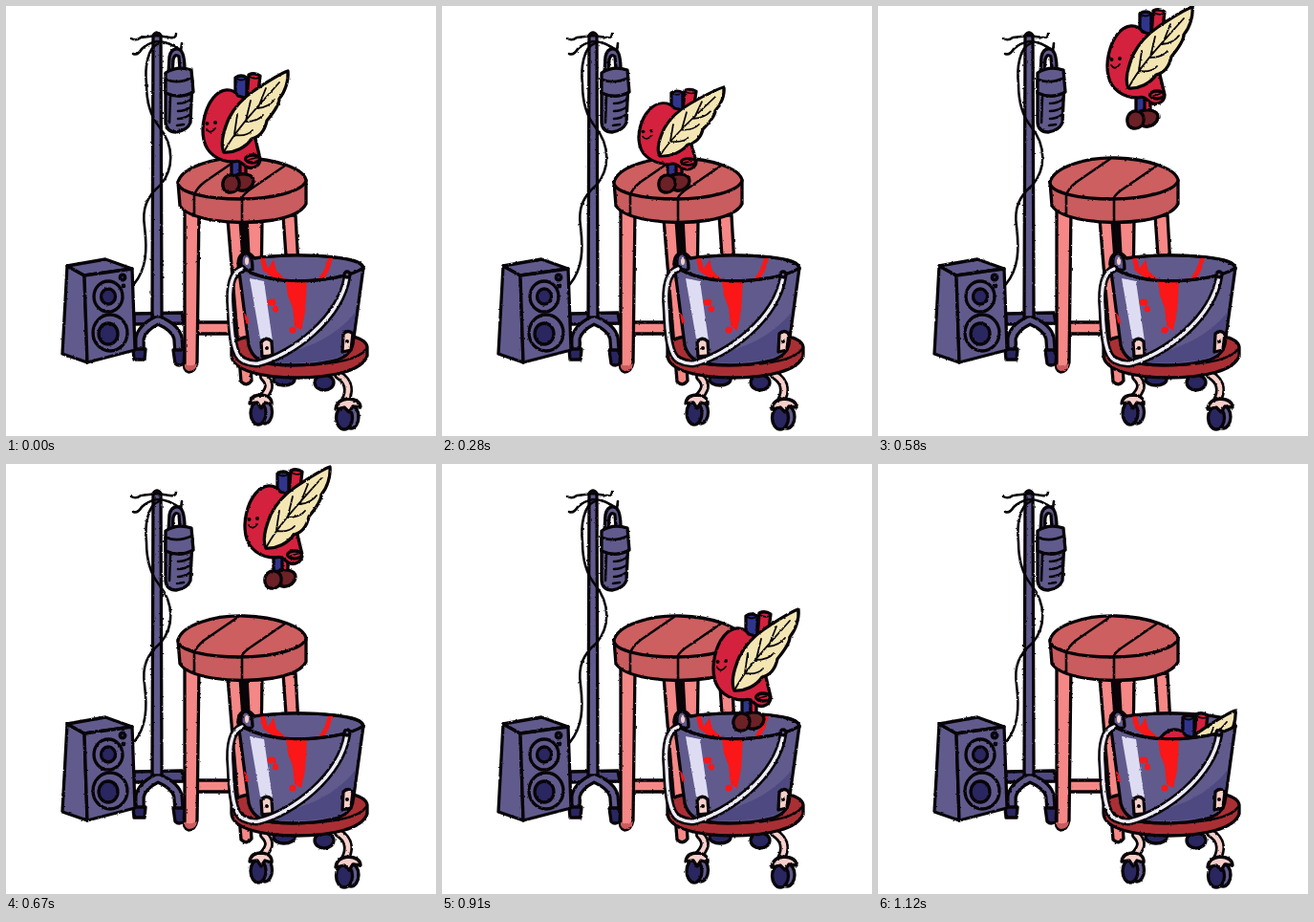
An HTML page that plays this animation: 450 px wide and 450 px high, repeating every 1.18 s.

```html
<!DOCTYPE html>
<html lang="en">
<head>
<meta charset="utf-8">
<title>Bucket jump</title>
<style>
html, body { margin: 0; width: 100%; height: 100%; overflow: hidden; background: #fff; }
svg { display: block; width: 100vw; height: 100vh; }
.ink { stroke: #080408; stroke-width: 3.3; stroke-linejoin: round; stroke-linecap: round; }
.line { fill: none; stroke: #080408; stroke-width: 2.6; stroke-linecap: round; stroke-linejoin: round; }
.thin { stroke-width: 1.8; }
.purple { fill: #605b8c; }
.shade { fill: #4e4980; }
.navy { fill: #292660; }
.seat { fill: #cd5f60; }
.side { fill: #c95c5e; }
.pink { fill: #f58886; }
.pale { fill: #f7cfca; }
.cart { fill: #a92f34; }
.blood { fill: #fb1717; }
.organ { fill: #d4213e; }
.blue { fill: #30358c; }
.shoe { fill: #6b2126; }
.leaf { fill: #f4e6b3; }
.black { fill: #080408; }
.tube { fill: none; stroke-linecap: round; stroke-linejoin: round; }
</style>
</head>
<body>
<svg viewBox="0 0 450 450">
  <defs>
    <filter id="rough" filterUnits="userSpaceOnUse" x="0" y="0" width="450" height="450" color-interpolation-filters="sRGB">
      <feTurbulence id="grain" type="fractalNoise" baseFrequency=".36" numOctaves="1" seed="2"/>
      <feDisplacementMap in="SourceGraphic" scale="2.4" xChannelSelector="R" yChannelSelector="G"/>
    </filter>
    <clipPath id="aboveRim">
      <path d="M0 0H450V274H374C362 282 330 288 302 288C275 287 250 280 243 270H0Z"/>
    </clipPath>
    <path id="standLegs" d="M158 329Q142 337 140 348V362M160 329Q178 337 180 348L181 362"/>
    <path id="handle" d="M247 275C236 279 233 296 235 318C236 344 238 366 248 371Q256 375 264 374C300 365 350 327 357 283"/>
    <path id="leftFork" d="M270 388C278 396 276 402 267 411"/>
    <path id="rightFork" d="M348 386C361 394 359 405 355 413"/>
  </defs>

  <g filter="url(#rough)">
    <g id="stand">
      <path class="ink shade" d="M134 322L184 321L186 332L134 333Z"/>
      <use href="#standLegs" class="tube" stroke="#080408" stroke-width="11.5"/>
      <path class="ink purple" d="M154 31Q158 25 162 31L163 326H153Z"/>
      <use href="#standLegs" class="tube" stroke="#605b8c" stroke-width="5"/>
      <path class="ink navy" d="M133 359H146L145 370H134Z"/>
      <path class="ink navy" d="M175 360H187L186 374Q181 378 177 374Z"/>
      <path class="line" d="M131 34Q136 37 141 33L158 31L172 33Q178 34 178 29M133 50Q138 52 142 45Q148 39 158 37Q171 37 183 47L184 39"/>
      <path class="line" d="M160 39C148 43 145 65 147 82C147 103 152 116 160 126C177 147 175 171 162 187C148 199 142 211 145 231C148 256 147 275 134 291"/>
    </g>

    <g id="bottle">
      <path class="ink purple" d="M170 70L171 53Q173 44 180 45Q187 46 187 67H182L181 53Q177 49 175 56L174 71Z"/>
      <path class="ink purple" d="M167 77L167 122Q168 132 178 132Q190 130 193 122L195 78Z"/>
      <path class="ink purple" d="M167 70Q179 62 194 67L196 90Q182 98 167 91Z"/>
      <path class="line" d="M168 77Q180 82 195 75M180 102Q187 102 193 98M180 110Q187 110 193 106M180 118Q186 118 192 114M179 125L186 124"/>
      <path class="line" d="M172 95L171 122"/>
    </g>

    <g id="speaker">
      <path class="ink purple" d="M64 272L82 282L85 373L59 364Z"/>
      <path class="ink purple" d="M64 272L104 265L132 275L82 282Z"/>
      <path class="ink purple" d="M82 282L132 275L135 360L85 373Z"/>
      <ellipse class="ink purple" cx="107" cy="304" rx="15" ry="16"/>
      <ellipse class="ink navy" cx="107" cy="304" rx="7.5" ry="8"/>
      <ellipse class="ink purple" cx="109" cy="342" rx="18" ry="19"/>
      <ellipse class="ink navy" cx="107" cy="343" rx="10" ry="11"/>
      <circle class="ink navy" cx="122" cy="284" r="2.8"/>
      <circle class="black" cx="123" cy="293" r="2.4"/>
    </g>

    <g id="stool">
      <path class="ink pink" d="M192 331H247V343H192Z"/>
      <path class="black" d="M244 225H253V272H246Z"/>
      <path class="ink pink" d="M232 223H245L257 392Q252 399 246 393Z"/>
      <path class="ink pink" d="M252 223H268L267 300H256Z"/>
      <path class="ink pink" d="M290 219H303L307 290H295Z"/>
      <path class="ink pink" d="M187 213H202L200 373Q198 383 191 383Q185 381 187 373Z"/>
      <path class="side" d="M187 375Q193 378 200 374Q199 382 191 382Q186 380 187 375Z"/>
      <path class="ink side" d="M180 184L182 209Q188 219 216 224Q247 229 280 224Q308 219 314 207L314 182Z"/>
      <path class="ink seat" d="M180 185C183 168 220 158 249 159C282 160 313 170 314 183C310 194 279 202 245 202C212 202 181 196 180 185Z"/>
      <path class="line" d="M197 198Q199 191 208 184L243 160M246 202Q249 196 257 191L292 167M197 199V219M247 203V227"/>
    </g>

    <g id="cart">
      <ellipse class="ink navy" cx="333" cy="394" rx="10" ry="8"/>
      <ellipse class="ink navy" cx="291" cy="391" rx="11" ry="6"/>
      <use href="#leftFork" class="tube" stroke="#080408" stroke-width="10"/>
      <use href="#leftFork" class="tube" stroke="#f7cfca" stroke-width="4.5"/>
      <use href="#rightFork" class="tube" stroke="#080408" stroke-width="10"/>
      <use href="#rightFork" class="tube" stroke="#f7cfca" stroke-width="4.5"/>
      <ellipse class="ink purple" cx="271" cy="425" rx="7.5" ry="12"/>
      <ellipse class="ink navy" cx="264" cy="426" rx="8" ry="12"/>
      <path class="ink pale" d="M255 416Q256 407 267 407Q279 408 278 417L271 415L267 421L263 415Z"/>
      <ellipse class="ink purple" cx="361" cy="430" rx="8" ry="12"/>
      <ellipse class="ink navy" cx="354" cy="431" rx="8.5" ry="12"/>
      <path class="ink pale" d="M345 422Q346 412 358 411Q371 412 371 420L363 419L359 425L354 420Z"/>
      <path class="ink cart" d="M236 354C243 345 275 341 308 342C348 341 377 345 378 357V366C373 382 340 389 304 389C270 389 237 382 236 366Z"/>
      <path class="line" d="M239 360C250 373 279 377 308 376C345 375 369 370 377 359"/>
    </g>

    <g id="bucketBack">
      <path class="ink purple" d="M243 270C243 260 249 256 256 260L260 264C286 260 320 260 344 263C362 265 374 268 374 275C360 284 330 288 302 288C275 287 250 280 243 270Z"/>
      <path class="blood" d="M266 264H271L274 275L280 265L283 277L294 287H285L276 282L269 277Z"/>
      <path class="blood" d="M337 264H342L338 277L333 285H327L333 276Z"/>
      <path class="line" d="M260 264C286 260 320 260 344 263C362 265 374 268 374 275"/>
    </g>

    <g clip-path="url(#aboveRim)">
      <g id="hero">
        <g id="body">
          <path class="ink organ" d="M244 156H251V181H244Z"/>
          <path class="ink blue" d="M236 153H245V181H236Z"/>
          <path class="ink blue" d="M240 75Q246 71 252 75V100H240Z"/>
          <path class="line thin" d="M241 76Q246 79 251 76"/>
          <path class="ink organ" d="M254 72Q260 69 266 73L263 98H252Z"/>
          <path class="line thin" d="M255 74Q260 77 265 75"/>
          <path class="ink organ" d="M243 94C237 85 225 86 217 96C208 107 204 126 207 140C210 154 222 163 238 163C245 161 246 164 251 168C258 172 266 167 266 160L261 139L262 100Z"/>
          <ellipse class="ink organ" cx="258" cy="160" rx="7.5" ry="4"/>
          <path class="line thin" d="M254 161L261 159"/>
          <path class="ink leaf" d="M228 153C224 145 228 130 233 118C239 106 247 97 259 89C271 81 284 72 295 68C296 78 292 90 286 97C286 104 278 114 273 120C271 130 265 137 257 139C251 148 239 154 228 153Z"/>
          <path class="line thin" d="M229 151C240 130 263 106 286 80M239 134L242 114M251 120L256 99M264 106L272 86M239 135Q252 137 258 130M250 121Q264 121 269 114M263 107Q275 106 281 98"/>
          <circle class="black" cx="210.5" cy="123" r="2"/>
          <circle class="black" cx="219" cy="122" r="2"/>
          <path class="line thin" d="M210 129Q214 135 219 128"/>
        </g>
        <path class="ink shoe" d="M237 179C246 173 259 176 259 183C258 192 248 195 242 192Z"/>
        <path class="ink shoe" d="M230 179C235 175 243 177 244 184C245 192 239 196 233 195C226 194 225 184 230 179Z"/>
      </g>
    </g>

    <g id="bucketFront">
      <path class="ink purple" d="M243 270C250 280 275 287 302 288C330 288 362 283 374 274L363 354Q360 367 344 371Q310 379 274 374Q258 370 254 355Z"/>
      <path class="shade" d="M366 320L361 352Q358 365 343 369Q310 376 275 372L264 366C305 366 345 347 366 320Z"/>
      <path fill="#dddcf2" d="M255 285L270 288L279 351L266 348Z"/>
      <path class="blood" d="M293 288H315L313 321L309 339L302 335L300 316L295 303Z"/>
      <ellipse class="blood" cx="278" cy="310" rx="4.5" ry="3.5"/>
      <ellipse class="blood" cx="282" cy="317" rx="3" ry="3.5"/>
      <circle class="blood" cx="300" cy="339" r="3.5"/>
      <path class="blood" d="M249 321Q254 325 254 333L251 332Z"/>
      <path class="line" d="M243 270C250 280 275 287 302 288C330 288 362 283 374 274"/>
      <path class="ink purple" d="M246 271Q245 258 252 259Q258 261 258 275Q253 279 246 271Z"/>
      <ellipse class="pale" cx="252" cy="267" rx="2" ry="4"/>
      <path class="ink pale" d="M267 352Q272 345 278 351L279 366L268 367ZM353 343Q358 338 363 343L361 360L352 362Z"/>
      <circle class="black" cx="273" cy="358" r="2"/>
      <circle class="black" cx="357" cy="351" r="2"/>
      <use href="#handle" class="tube" stroke="#080408" stroke-width="8.5"/>
      <use href="#handle" class="tube" stroke="#eeecf8" stroke-width="3.4"/>
      <circle class="ink purple" cx="357" cy="281" r="3"/>
    </g>
  </g>
</svg>
<script>
const LOOP = 1180;
const holds = [0, 30, 90, 130, 160, 190, 220, 280, 310, 370, 400, 460, 550,
  580, 640, 700, 730, 790, 880, 910, 1000, 1060, 1090, 1120];

// time, x, y, body height
const poses = [
  [0, 0, 0, 1], [90, 0, 0, .98], [220, 0, 0, .88], [280, 0, 0, .85],
  [310, 0, 0, .87], [400, 0, 0, 1], [460, 7, -14, 1], [550, 28, -64, 1],
  [580, 34, -67, 1], [640, 44, -65, 1], [700, 53, -49, 1], [730, 58, -36, 1],
  [790, 67, -6, 1], [880, 75, 58, 1], [910, 78, 84, 1], [1000, 83, 136, 1],
  [1060, 82, 170, 1], [1120, 79, 190, 1], [LOOP, 79, 190, 1]
];
const hero = document.getElementById('hero');
const body = document.getElementById('body');
const grain = document.getElementById('grain');
let shown = -1;

function poseAt(t) {
  const i = poses.findIndex(p => p[0] > t);
  const a = poses[i - 1], b = poses[i];
  const k = (t - a[0]) / (b[0] - a[0]);
  return a.map((v, n) => v + (b[n] - v) * k);
}

function draw(now) {
  const t = now % LOOP;
  const step = holds.filter(h => h <= t).length - 1;
  if (step !== shown) {
    shown = step;
    const [, x, y, tall] = poseAt(holds[step]);
    hero.setAttribute('transform', `translate(${x} ${y})`);
    body.setAttribute('transform', `translate(0 180) scale(1 ${tall}) translate(0 -180)`);
    grain.setAttribute('seed', 2 + step % 3);
  }
}

const start = performance.now();
function tick() {
  draw(performance.now() - start);
  requestAnimationFrame(tick);
}
tick();
</script>
</body>
</html>
```
